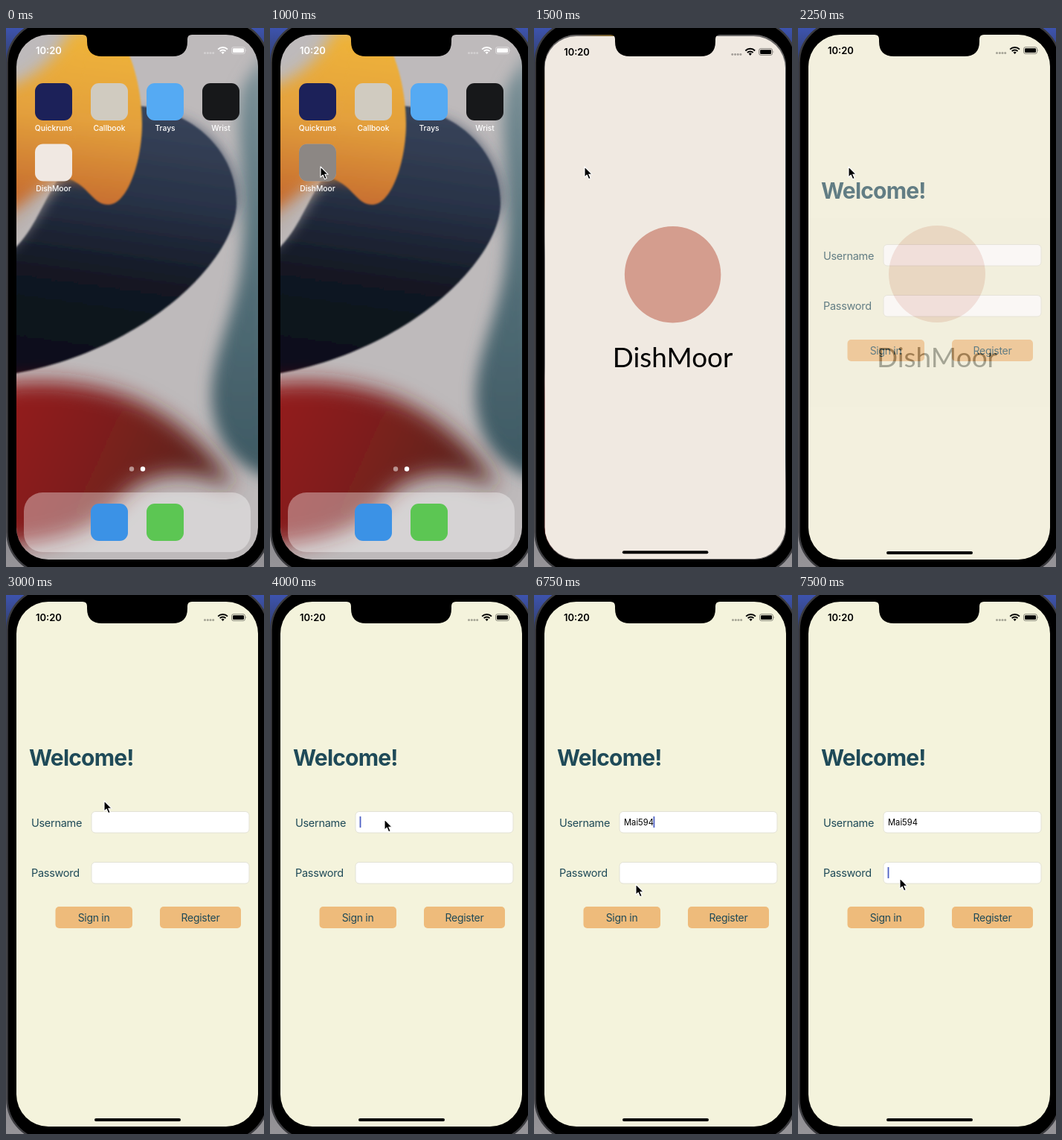
These frames come from a looping animation (347x723 px, 8 s). An HTML page:

```html
<!DOCTYPE html>
<html lang="en">
<head>
<meta charset="utf-8">
<title>Sign-in walkthrough</title>
<style>
html, body { margin: 0; width: 100%; height: 100%; overflow: hidden; background: #000; }
svg { display: block; width: 347px; height: 723px; font-family: Inter, Roboto, sans-serif; }
.label { font-size: 10.3px; font-weight: 500; fill: #fff; text-anchor: middle; }
.clock { font-size: 13px; font-weight: 600; }
.form { font-size: 14.5px; letter-spacing: -.3px; fill: #1f4a58; }
.button { font-size: 14px; letter-spacing: -.3px; fill: #1f4a58; text-anchor: middle; }
</style>
</head>
<body>
<svg viewBox="0 0 347 723" xmlns="http://www.w3.org/2000/svg">
  <defs>
    <linearGradient id="desk" x2="0" y2="1">
      <stop stop-color="#3d53ae"/><stop offset=".06" stop-color="#33406f"/>
      <stop offset=".5" stop-color="#4c4c52"/><stop offset="1" stop-color="#969498"/>
    </linearGradient>
    <linearGradient id="navy" gradientUnits="userSpaceOnUse" x1="200" y1="100" x2="150" y2="460">
      <stop stop-color="#3a465c"/><stop offset=".35" stop-color="#293348"/>
      <stop offset=".68" stop-color="#121722"/><stop offset="1" stop-color="#0e101a"/>
    </linearGradient>
    <linearGradient id="amber" gradientUnits="userSpaceOnUse" x1="130" y1="10" x2="100" y2="240">
      <stop stop-color="#efb439"/><stop offset=".5" stop-color="#e3a03c"/><stop offset="1" stop-color="#c66c2f"/>
    </linearGradient>
    <linearGradient id="red" x2="1" y2=".3">
      <stop stop-color="#9a1f1f"/><stop offset=".5" stop-color="#7f1f1c"/><stop offset="1" stop-color="#58241f"/>
    </linearGradient>
    <linearGradient id="teal" x2="0" y2="1">
      <stop stop-color="#7d9299"/><stop offset=".4" stop-color="#58747d"/><stop offset="1" stop-color="#3d5862"/>
    </linearGradient>
    <filter id="soft1" x="-20%" y="-20%" width="140%" height="140%"><feGaussianBlur stdDeviation="1.2"/></filter>
    <filter id="soft10" x="-30%" y="-30%" width="160%" height="160%"><feGaussianBlur stdDeviation="10"/></filter>
    <filter id="soft14" x="-30%" y="-30%" width="160%" height="160%"><feGaussianBlur stdDeviation="14"/></filter>
    <clipPath id="screen"><rect x="14" y="9" width="325" height="704" rx="43"/></clipPath>
    <clipPath id="pane"><rect id="paneBox" x="14" y="9" width="325" height="704" rx="43"/></clipPath>
    <g id="status">
      <text class="clock" x="40" y="35">10:20</text>
      <g opacity=".32">
        <circle cx="267.5" cy="33.5" r="1.5"/><circle cx="271.3" cy="33.5" r="1.5"/>
        <circle cx="275" cy="33.5" r="1.5"/><circle cx="278.7" cy="33.5" r="1.5"/>
      </g>
      <g fill="none" stroke="currentColor" stroke-width="2">
        <path d="M285.2 28.6a9 9 0 0 1 12.8 0M287.7 31.1a5.6 5.6 0 0 1 7.8 0"/>
      </g>
      <path d="M291.6 35l-2.1-2.3a3 3 0 0 1 4.2 0z"/>
      <rect x="303.5" y="25.7" width="18" height="8.8" rx="2.4" fill="none" stroke="currentColor" opacity=".45"/>
      <rect x="305" y="27.2" width="15" height="5.8" rx="1.2"/>
      <path d="M322.6 28.6q1.5 1.4 0 3z" opacity=".5"/>
    </g>
  </defs>

  <rect width="347" height="723" fill="url(#desk)"/>
  <rect x="1.5" y="-9" width="351" height="741" rx="56" fill="#000" stroke="#3b3b3f" stroke-width="2.5"/>

  <g clip-path="url(#screen)">
    <g id="home">
      <g id="wall">
        <rect x="-20" y="-20" width="390" height="770" fill="#bebabb"/>
        <path d="M350 30L318 80C306 140 326 220 318 300C312 385 272 440 277 505C284 565 315 590 360 606Z" fill="url(#teal)" filter="url(#soft10)"/>
        <path d="M170 120C250 108 309 165 309 235L290 270L170 250Z" fill="#36435a" filter="url(#soft10)"/>
        <path d="M-10 310C40 288 50 215 95 170L172 104C250 108 310 165 310 235C310 310 190 430 14 463L-10 467Z" fill="url(#navy)" filter="url(#soft1)"/>
        <path d="M-20 310L-20 210L75 180L72 206C48 222 45 265 -20 310Z" fill="#b9b0ad" filter="url(#soft10)"/>
        <path d="M-20 85C35 72 65 45 88 0L130 0L125 205L75 200C45 210 28 240 -20 262Z" fill="url(#amber)" filter="url(#soft10)"/>
        <path d="M112 0L146 0C173 36 183 90 183 128C183 180 163 237 138 237C116 237 112 212 84 202Z" fill="url(#amber)" filter="url(#soft1)"/>
        <path d="M-30 482C40 468 110 474 165 495C220 518 275 560 308 618C255 592 200 592 165 622C135 650 120 690 -30 696Z" fill="url(#red)" filter="url(#soft14)"/>
      </g>
      <g id="apps">
        <rect id="dock" x="24" y="623" width="305" height="80" rx="25" fill="#fff" opacity=".36"/>
        <circle cx="169" cy="591.5" r="3.2" fill="#fff" opacity=".5"/>
        <circle cx="184" cy="591.5" r="3.2" fill="#fff"/>
      </g>
      <use id="homeStatus" href="#status" fill="#fff" color="#fff"/>
    </g>
    <rect id="dim" width="347" height="723" opacity=".45"/>

    <g id="login">
      <rect x="14" y="9" width="325" height="704" fill="#f4f3dc"/>
      <text x="31" y="228.5" font-size="30" font-weight="700" letter-spacing="-.8" fill="#1f4a58">Welcome!</text>
      <text class="form" x="34" y="311">Username</text>
      <text class="form" x="34" y="378">Password</text>
      <g fill="#fff" stroke="#e3e2d6">
        <rect x="115" y="290.5" width="212" height="28.5" rx="5"/>
        <rect x="115" y="358.5" width="212" height="28.5" rx="5"/>
      </g>
      <g fill="#eebb7b">
        <rect x="66.5" y="418" width="103.5" height="29" rx="5"/>
        <rect x="207" y="418" width="109" height="29" rx="5"/>
      </g>
      <text class="button" x="118" y="438">Sign in</text>
      <text class="button" x="261.5" y="438">Register</text>
      <text id="typed" x="121" y="309" font-size="11.2"></text>
      <rect id="caret" width="1.8" height="15" rx=".6" fill="#4d60c4"/>
    </g>

    <g id="window">
      <g id="splash" clip-path="url(#pane)">
        <rect x="14" y="9" width="325" height="704" fill="#f0e9e1"/>
        <circle cx="187" cy="330" r="65" fill="#d49d8e"/>
        <text x="187" y="455" font-family="Lato, sans-serif" font-size="37" text-anchor="middle">DishMoor</text>
      </g>
      <use href="#status" fill="#000" color="#000"/>
      <rect id="grip" x="119" width="116" height="4" rx="2"/>
    </g>
  </g>

  <path d="M103 0V9Q109 9 109 15V18Q109 38 129 38H224Q244 38 244 18V15Q244 9 250 9V0Z"/>
  <path id="cursor" d="M0 0V14.2L3.2 11.2L5.6 16.7L8.2 15.6L5.8 10.3H10.2Z" stroke="#fff" stroke-width="1.1" stroke-linejoin="round"/>
</svg>
<script>
const LOOP = 8000, STEP = 250;
const el = id => document.getElementById(id);
const set = (id, attrs) => { for (const k in attrs) el(id).setAttribute(k, attrs[k]); };
const show = (id, on) => set(id, { visibility: on ? 'visible' : 'hidden' });

function add(tag, attrs, text = '') {
  const node = document.createElementNS('http://www.w3.org/2000/svg', tag);
  for (const k in attrs) node.setAttribute(k, attrs[k]);
  node.textContent = text;
  el('apps').append(node);
}

const apps = [
  [39, 74, '#1c2159', 'Quickruns'], [114, 74, '#d0cbc0', 'Callbook'],
  [189, 74, '#55aaf3', 'Trays'], [264, 74, '#17181a', 'Wrist'],
  [39, 155.5, '#f0e8e2', 'DishMoor'], [114, 638, '#3b92e6', ''], [189, 638, '#5cc653', '']
];
apps.forEach(([x, y, fill, name]) => {
  add('rect', { x, y, width: 50, height: 50, rx: 11, fill });
  if (name) add('text', { x: x + 25, y: y + 63.5, class: 'label' }, name);
});
add('rect', { id: 'press', x: 39, y: 155.5, width: 50, height: 50, rx: 11, opacity: .42 });

// Each track lists [start time, values...]; a value holds until the next start.
const pointer = [
  [0, -50, -50], [500, 47, 212], [750, 68, 186], [3000, 132, 276], [3250, 152, 301],
  [3500, 154, 301], [6250, 134, 356], [6500, 133, 382], [6750, 137, 388],
  [7000, 137, 386], [7250, 137, 380]
];
const zoom = [[0, 14, 9, 1, 704], [1250, 16.7, 37, .919, 669], [1500, 14.3, 11, .996, 704], [1750, 14, 9, 1, 704]];
const typing = [[0, 0], [4750, 1], [5000, 2], [5250, 3], [5750, 4], [6000, 6]];
const blink = [[0, 0], [4000, 1], [4500, 0], [4750, 1], [6500, 0], [6750, 1], [7000, 0], [7500, 2]];
const user = 'Mai594';

const at = (track, t) => track.filter(k => k[0] <= t).pop().slice(1);

function draw(time) {
  const t = Math.floor(time % LOOP / STEP) * STEP;
  const opening = t >= 1250, fade = t >= 2250;

  show('home', t < 1750);
  show('press', t === 1000);
  show('dim', opening && t < 1750);
  el('wall').style.filter = opening ? 'blur(7px)' : '';
  el('apps').style.filter = opening ? 'blur(9px)' : '';
  set('apps', { opacity: opening ? .4 : 1 });
  set('dock', { opacity: opening ? 0 : .36 });
  set('homeStatus', { opacity: opening ? .35 : 1 });

  const [x, y, s, h] = at(zoom, t);
  show('window', opening);
  set('window', { transform: `translate(${x} ${y}) scale(${s}) translate(-14 -9)` });
  set('paneBox', { height: h });
  set('grip', { y: h - 2, opacity: t === 1250 ? .5 : 1 });
  set('splash', { opacity: !fade ? 1 : t < 2500 ? .32 : 0 });

  show('login', fade);
  el('typed').textContent = user.slice(0, at(typing, t)[0]);
  const field = at(blink, t)[0];
  show('caret', field > 0);
  const end = field === 1 ? el('typed').getComputedTextLength() : 0;
  set('caret', { x: 120.6 + end, y: field === 2 ? 365 : 297 });

  const [cx, cy] = at(pointer, t);
  set('cursor', { transform: `translate(${cx} ${cy})` });
}

const start = performance.now();
function tick() {
  draw(performance.now() - start);
  requestAnimationFrame(tick);
}
tick();
</script>
</body>
</html>
```
